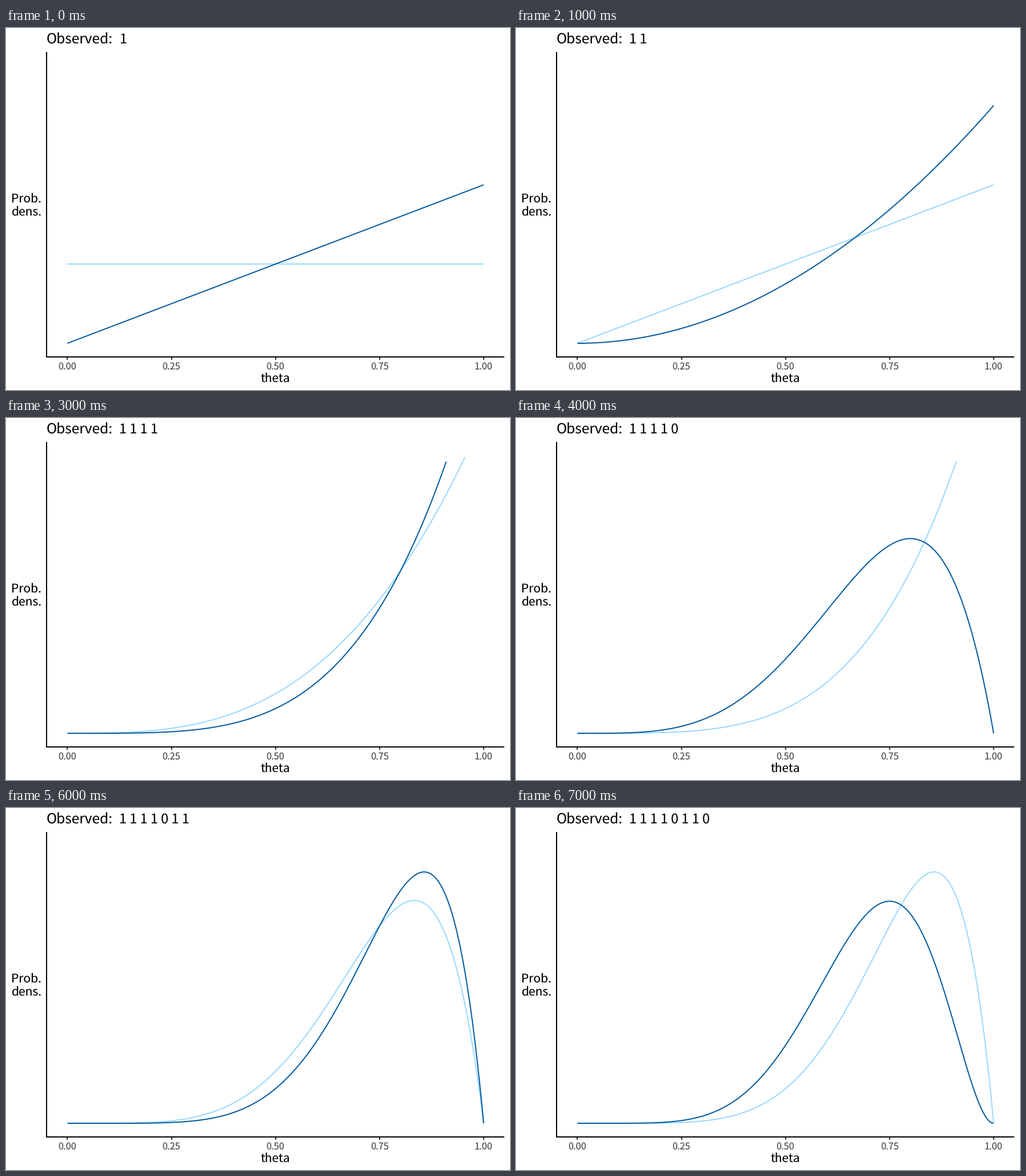
Recreate the animation shown at these times as a matplotlib script. Size 882 by 635 pixels, loop 8000 ms.

```python
from math import comb

import matplotlib.pyplot as plt
import numpy as np
from matplotlib.animation import FuncAnimation

W, H, DPI = 882, 635, 100
PT = 72 / DPI  # points per pixel

FLIPS = [1, 1, 1, 1, 0, 1, 1, 0]
PRIOR, POSTERIOR = "#99d9ff", "#005aa0"

# Panel edges in pixels; data fill all but a 5 % margin on each side
LEFT, RIGHT, TOP, BOTTOM = 71, 872.3, 42.3, 577.4
Y_MAX = 3.5
X_UNIT = (RIGHT - LEFT) / 1.1
Y_UNIT = (BOTTOM - TOP) / 1.1 / Y_MAX
X0 = LEFT + 0.05 * X_UNIT
Y0 = BOTTOM - 0.05 * Y_UNIT * Y_MAX

plt.rcParams["font.family"] = ["Noto Sans CJK JP", "DejaVu Sans"]
plt.rcParams["text.hinting"] = "none"
plt.rcParams["text.hinting_factor"] = 1

fig = plt.figure(figsize=(W / DPI, H / DPI), dpi=DPI, facecolor="white")
ax = fig.add_axes([0, 0, 1, 1])
ax.set_xlim(0, W)
ax.set_ylim(H, 0)
ax.axis("off")


def label(x, y, text, size, color="black", ha="left"):
    return ax.text(x, y, text, fontsize=size * PT, color=color, ha=ha,
                   va="baseline")


def stroke(x, y, color, width=2):
    return ax.plot(x, y, color=color, lw=width * PT,
                   solid_capstyle="butt", solid_joinstyle="round")[0]


theta = np.linspace(0, 1, 201)


def density(flips):
    """Beta posterior of a uniform prior, in pixels, cut off above Y_MAX."""
    n, k = len(flips), sum(flips)
    d = (n + 1) * comb(n, k) * theta**k * (1 - theta)**(n - k)
    return np.where(d <= Y_MAX, Y0 - Y_UNIT * d, np.nan)


xs = X0 + X_UNIT * theta
prior = stroke(xs, density([]), PRIOR)
posterior = stroke(xs, density(FLIPS[:1]), POSTERIOR)

for t in (0, 0.25, 0.5, 0.75, 1):
    x = X0 + X_UNIT * t
    stroke([x, x], [BOTTOM, BOTTOM + 5], "#333333")
    label(x, 598.3, f"{t:.2f}", 16.4, "#4d4d4d", "center")

stroke([LEFT, LEFT], [TOP, BOTTOM + 1], "black")
stroke([LEFT - 1, RIGHT], [BOTTOM, BOTTOM], "black")

label((LEFT + RIGHT) / 2, 621, "theta", 20.8, ha="center")
label(9, 306, "Prob.", 21)
label(9, 329, "dens.", 21)
label(70.5, 27, "Observed:", 24.5)
digits = label(198, 27, "", 23.5)


def update(i):
    prior.set_ydata(density(FLIPS[:i]))
    posterior.set_ydata(density(FLIPS[:i + 1]))
    digits.set_text(" ".join(map(str, FLIPS[:i + 1])))
    return prior, posterior, digits


anim = FuncAnimation(fig, update, frames=len(FLIPS), interval=1000,
                     repeat=True, repeat_delay=0)
plt.show()
```
